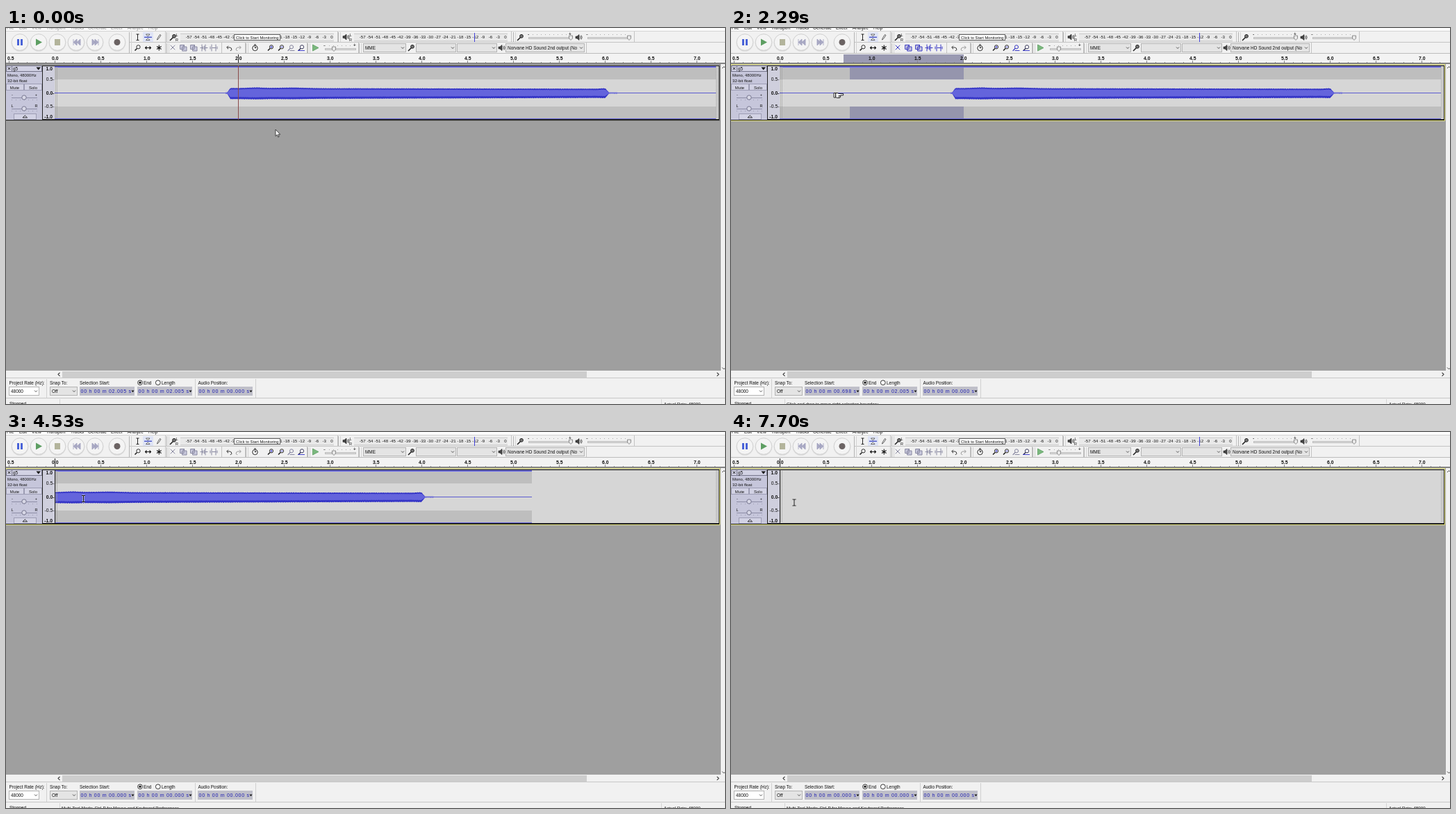
Write an HTML page that moves like this. It is 1035 by 541 pixels and loops after 8000 ms.

```html
<!DOCTYPE html>
<html lang="en">
<head>
<meta charset="utf-8">
<title>Audio editor</title>
<style>
  html, body { margin: 0; width: 100%; height: 100%; overflow: hidden; background: #9f9f9f; }
  svg { display: block; width: 1035px; height: 541px; }
  text { font: 6.45px "Liberation Sans", Arial, sans-serif; fill: #111; white-space: pre; }
  rect { shape-rendering: crispEdges; }
</style>
</head>
<body>
<svg id="stage" viewBox="0 0 1035 541"></svg>
<script>
const stage = document.getElementById('stage');

function el(tag, attrs, parent = stage, content) {
  const node = document.createElementNS('http://www.w3.org/2000/svg', tag);
  set(node, attrs);
  if (content !== undefined) node.textContent = content;
  return parent.appendChild(node);
}
function set(node, attrs) {
  for (const k in attrs) node.setAttribute(k, attrs[k]);
}
const rect = (x, y, width, height, fill, stroke, parent) =>
  el('rect', { x, y, width, height, fill, ...(stroke && { stroke, 'stroke-width': 1 }) }, parent);
const path = (d, stroke = '#222', fill = 'none', width = 1, parent) =>
  el('path', { d, stroke, fill, 'stroke-width': width }, parent);
const disc = (cx, cy, r, fill, stroke = 'none', parent) =>
  el('circle', { cx, cy, r, fill, stroke }, parent);
const label = (x, y, s, style = '', anchor = 'start', parent) =>
  el('text', { x, y, style, 'text-anchor': anchor }, parent, s);

const ORIGIN = 70, SCALE = 132;
const toX = sec => ORIGIN + sec * SCALE;
const toSec = x => Math.max(0, (x - ORIGIN) / SCALE);

// ---------- toolbars ----------
rect(0, 0, 1035, 52, '#f1f1f1');
rect(0, 0, 1035, 4, '#fdfdfd');
rect(0, 4, 1035, 1, '#d2d2d2');
rect(177, 20, 858, 1, '#c4c4c4');
rect(0, 36, 1035, 1, '#bcbcbc');
const menu = [['File', 1], ['Edit', 19], ['View', 37], ['Transport', 58], ['Tracks', 93],
  ['Generate', 118], ['Effect', 151], ['Analyze', 175], ['Help', 205]]
  .map(([s, x]) => label(x, 2.3, s));

[20, 47, 74, 101, 128, 160].forEach(x => {
  disc(x, 21.5, 12.3, '#dcdcdc');
  disc(x, 20.5, 11.8, '#f4f4f4', '#d0d0d0');
});
rect(16, 16, 3, 9, '#4a63d8');
rect(21, 16, 3, 9, '#4a63d8');
path('M43 15.5L52 20.5L43 25.5Z', 'none', '#5d9e62');
rect(70, 16, 8, 9, '#b3b49b');
path('M102 16V25L97 20.5ZM107 16V25L102 20.5ZM97 16V25', '#a0a0bd', '#a9a9c4', .8);
path('M124 16V25L129 20.5ZM128 16V25L133 20.5ZM133 16V25', '#a0a0bd', '#a9a9c4', .8);
disc(160, 20.5, 4.5, '#6b6363');

const grip = (x, y, h) => { rect(x, y, 1, h, '#b4b4b4'); rect(x + 3, y, 1, h, '#d4d4d4'); };
grip(177, 6, 30);
[[231, 6], [478, 6], [730, 6], [231, 22], [345, 22], [434, 22], [508, 22]].forEach(([x, y]) => grip(x, y, 14));
[229, 477, 727, 904].forEach(x => rect(x, 5, 1, 15, '#c4c4c4'));
[229, 310, 344, 433, 507, 835].forEach(x => rect(x, 21, 1, 15, '#c4c4c4'));

// editing tools
rect(197, 6, 15, 14, '#dfe4f5');
path('M187.5 9H191.5M189.5 9V17.5M187.5 17.5H191.5');
path('M199 13.3H210', '#4a55c8', 'none', 1.4);
path('M201.5 9H207L204.3 12ZM201.5 17.5H207L204.3 14.7Z', '#444', '#fff', .8);
path('M217.5 17L218.3 14.5L221.5 9.5L223 10.5L219.5 15.5Z', '#333', '#fff', .8);
path('M200.5 28.5H208.5M202.5 26.5L200.5 28.5L202.5 30.5M206.5 26.5L208.5 28.5L206.5 30.5', '#111', 'none', 1.1);
path('M220.3 24.5V32.5M217 26.5L223.6 30.5M223.6 26.5L217 30.5', '#111', 'none', 1.1);

function lens(x, y, color = '#222', sign = '') {
  path(`M${x - 1} ${y + 1}L${x - 4} ${y + 4}`, color, 'none', 1.6);
  disc(x + 1, y - 1.2, 2.6, '#fff', color);
  if (sign) path(`M${x - .5} ${y - 1.2}h3` + (sign === '+' ? `M${x + 1} ${y - 2.7}v3` : ''), '#33c', 'none', .9);
}
lens(189.5, 28.5);
lens(381, 28.5, '#222', '+');
lens(396, 28.5, '#222', '-');
lens(425, 28.5, '#335');
path('M420 32.5H430', '#33c', 'none', .9);

function mic(x, y) {
  path(`M${x - 4} ${y + 4.5}L${x + 1} ${y - .5}`, '#222', 'none', 1.6);
  disc(x + 2, y - 1.7, 2.4, '#777', '#222');
}
function speaker(x, y) {
  path(`M${x - 4} ${y - 1.5}h2l3 -2.5v8l-3 -2.5h-2Z`, '#222', '#444', .6);
  path(`M${x + 2.5} ${y - 2}q1.6 2 0 4M${x + 4} ${y - 3}q2.4 3 0 6`, '#222', 'none', .8);
}
mic(240, 13.5); mic(740, 13.5); mic(583, 28.5);
speaker(489, 13); speaker(824, 13.5); speaker(713, 28.5);

// level meters
for (const x of [251, 501]) {
  rect(x, 7, 221, 13, '#e9e9e9');
  rect(x, 8, 221, 1, '#cfcfcf');
  rect(x, 18, 221, 1, '#cfcfcf');
  label(x - 5, 11.5, 'L', 'font-size:5.5px', 'middle');
  label(x - 5, 18.5, 'R', 'font-size:5.5px', 'middle');
  for (let db = -57; db <= 0; db += 3)
    label(x + 218 + db * 3.61, 15.4, db, 'font-size:6.1px', 'middle');
}
rect(674, 7, 1, 13, '#4444dd');
rect(328.5, 9.5, 66, 8, '#fff', '#666');
label(331, 15.7, 'Click to Start Monitoring', 'font-size:5.8px');

function slider(x, end, thumb, y, h = 6) {
  rect(x, y, end - x, 2, '#dedede', '#bdbdbd');
  for (let i = x; i <= end; i += 6) rect(i, y - 4, 1, 1, '#aaa');
  path(`M${thumb - 2.5} ${y - 2}h5v${h - 2}l-2.5 2.5l-2.5 -2.5Z`, '#777', '#e9e9e9', .8);
}
slider(752, 812, 813, 13); slider(837, 896, 897, 13); slider(459, 503, 472, 29);
label(751, 11, '-'); label(810, 11, '+'); label(835, 11, '-'); label(457, 27, '-'); label(500, 27, '+');
path('M441.5 24L450 28.5L441.5 33Z', '#559a5a', '#7bb87e', .7);

const chevron = (x, y) => path(`M${x - 2} ${y - 1}l2 2l2 -2`, '#444', 'none', .9);
function combo(x, y, w, h, s, fill = '#e4e4e4') {
  rect(x + .5, y + .5, w, h, fill, '#b4b4b4');
  chevron(x + w - 4, y + h / 2 + .5);
  label(x + 3, y + h / 2 + 2.8, s);
}
combo(514, 22, 61, 12, 'MME');
combo(590, 22, 57, 12, '');
combo(649, 22, 57, 12, '');
combo(719, 22, 113, 12, 'Norvane HD Sound 2nd output (No');

// clipboard icons that follow the selection
const clipIcons = el('g', { 'stroke-linecap': 'round' });
path('M237 25L243 31M243 25L237 31', null, 'none', 1, clipIcons);
for (const x of [251, 266]) {
  rect(x + .5, 24.5, 5, 6, '#ddd', null, clipIcons);
  path(`M${x} 24.5h5v6h-5ZM${x + 3} 27h6v6h-6Z`, null, '#c9c9dd', 1, clipIcons);
}
path('M282 24V33M287 24V33M280 28.5h2M287 28.5h3M283.5 27v3M285.5 26v5', null, 'none', 1, clipIcons);
path('M296 24V33M302 24V33M294 27v3M304 27v3M297 28.5h5', null, 'none', 1, clipIcons);
disc(411, 27.3, 2.6, '#eee', null, clipIcons);
path('M409 29.5L406 32.5M409 32.5h6', null, 'none', 1.2, clipIcons);
clipIcons.querySelectorAll('*').forEach(n => n.removeAttribute('stroke'));

path('M318 28h4.5q2.5 .3 2.3 3.5q-.3 1 -2 1M320 25.7L317.7 28L320 30.3', '#333', 'none', 1);
path('M338 28h-4.5q-2.5 .3 -2.3 3.5q.3 1 2 1M336 25.7L338.3 28L336 30.3', '#999', 'none', 1);
disc(358.5, 29, 3.7, '#fff', '#222');
path('M358.5 29V26.5M358.5 29L360.5 28M357 24H360', '#222', 'none', 1);

// ---------- time ruler ----------
rect(0, 37, 1035, 14, '#f3f3f3');
const rulerSel = rect(0, 38, 0, 12, '#9a9ab2');
for (let i = -5; i <= 72; i++) {
  const x = Math.round(toX(i / 10)), major = i % 5 === 0;
  rect(x, major ? 47 : 48.5, 1, major ? 3 : 1.5, '#888');
  if (major) label(x + (i < 0 ? 3 : .8), 46.3, Math.abs(i / 10).toFixed(1), 'font-size:6.8px;font-weight:bold', i < 0 ? 'end' : 'middle')
    .setAttribute('x', i < 0 ? 11.5 : x + .8);
}
const rulerMark = rect(0, 38, 1, 12, '#222');
rect(0, 50, 1035, 1, '#6a6a6a');
rect(0, 51, 1035, 442, '#9f9f9f');

// ---------- track ----------
const focus = rect(.5, 52.5, 1027, 81, 'none', '#e2e07a');
rect(0, 54, 1027, 79, '#222');
rect(0, 54, 52, 78, '#c6c6db');
rect(53, 55, 17, 76, '#cfcfdd');
rect(70, 55, 956, 76, '#d6d6d6');

rect(.5, 54.5, 51, 8, '#d2d2e4', '#77778c');
path('M2.8 56.6L6.2 60M6.2 56.6L2.8 60', '#111', 'none', 1);
rect(8, 55, 1, 8, '#77778c');
label(10, 61, 'g5');
path('M43.5 56.5H50L46.7 60.5Z', 'none', '#111');
label(2, 69.7, 'Mono, 48000Hz', 'font-size:5.9px');
label(2, 78, '32-bit float', 'font-size:6.1px');
rect(.5, 80.5, 25, 9, '#d2d2e4', '#9d9db4');
rect(26.5, 80.5, 25, 9, '#d2d2e4', '#9d9db4');
label(12.5, 87.6, 'Mute', 'font-size:6px', 'middle');
label(39, 87.6, 'Solo', 'font-size:6px', 'middle');
for (const [y, a, b] of [[100, '-', '+'], [116, 'L', 'R']]) {
  rect(8, y, 37, 1, '#8d8da6');
  for (let x = 8; x < 46; x += 6) rect(x, y + 3, 1, 1, '#9a9ab0');
  disc(26, y, 3.2, '#d8d8e6', '#777790');
  label(9, y - 2.5, a, 'font-size:5.6px', 'middle');
  label(43.5, y - 2.5, b, 'font-size:5.6px', 'middle');
}
rect(11.5, 123.5, 32, 8, '#d2d2e4', '#9d9db4');
path('M24 129L27.3 125.8L30.6 129Z', '#222', 'none', .9);

[['1.0', 61], ['0.5-', 76], ['0.0-', 95.5], ['-0.5-', 115.3], ['-1.0', 130]].forEach(([s, y], i) =>
  label(i % 4 ? 69.5 : 67, y, s, `font-size:6.8px;font-weight:${i % 2 ? 400 : 700}`, 'end'));

// audio clip
const BAND_Y = [56, 113], BAND_H = [18, 17];
const clip = el('g', {});
const bands = BAND_Y.map((y, i) => rect(70, y, 0, BAND_H[i], '#bebebe', null, clip));
const bandSel = BAND_Y.map((y, i) => rect(0, y, 0, BAND_H[i], '#9595ad', null, clip));
const rails = [55, 129.5].map(y => rect(70, y, 0, 1.5, '#6a6ade', null, clip));
const axis = rect(70, 93, 0, 1, '#5c5cd0', null, clip);
const mask = el('clipPath', { id: 'mask' });
const maskRect = rect(70, 54, 0, 78, '#000', null, mask);
const waveBox = el('g', { 'clip-path': 'url(#mask)' }, clip);
const wave = el('g', {}, waveBox);

// edges of the sound: quiet lead-in, long sustain, short release
function gate(x) {
  if (x < 319 || x > 868) return .12;
  return Math.min(1, .2 + (x - 319) / 5, .12 + (868 - x) / 6);
}
function envelope(high, low, ripple) {
  const upper = [], lower = [];
  for (let x = 316; x <= 880; x++) {
    const fade = (x - 322) / 545, g = gate(x);
    const bump = 1.1 * Math.exp(-(((x - 360) / 16) ** 2)) + Math.exp(-(((x - 412) / 24) ** 2))
      + .8 * Math.exp(-(((x - 860) / 6) ** 2));
    const noise = ripple * (Math.sin(x * 1.9) + Math.sin(x * 2.77 + Math.sin(x * .31) * 3));
    upper.push(`${x} ${(93.5 - g * (high - fade + bump * .8 + noise)).toFixed(2)}`);
    lower.unshift(`${x} ${(93.5 + g * (low - 1.8 * fade + bump * .4 - noise)).toFixed(2)}`);
  }
  return 'M' + upper.concat(lower).join('L') + 'Z';
}
path(envelope(7.1, 8.8, .25), 'none', '#3434c6', 1, wave);
path(envelope(5.2, 5.9, .15), 'none', '#6464dc', 1, wave);

for (const x of [71, 73, 1022, 1024])
  el('path', { d: `M${x + .5} 56V130`, stroke: '#999', 'stroke-dasharray': '1 1' });
const playLine = rect(0, 54, 1, 78, '#222');

// ---------- scrollbars ----------
rect(1029, 52, 6, 441, '#f1f1f1');
path('M1031 58l2.5 -2.5l2.5 2.5M1031 488.5l2.5 2.5l2.5 -2.5', '#444', 'none', 1);
rect(0, 493, 1035, 48, '#f1f1f1');
rect(81, 494, 755, 9, '#cdcdcd');
path('M77.5 495.8L75 498.3L77.5 500.8M1023.5 495.8L1026 498.3L1023.5 500.8', '#333', 'none', 1.1);
rect(0, 503, 1035, 1, '#c8c8c8');

// ---------- selection bar ----------
label(4.5, 512.8, 'Project Rate (Hz):');
label(63, 512.8, 'Snap To:');
label(106, 512.8, 'Selection Start:');
label(198, 512.8, 'End');
label(224, 512.8, 'Length');
label(276.5, 512.8, 'Audio Position:');
disc(193, 510.3, 3.4, '#fff', '#333');
disc(193, 510.3, 1.8, '#222');
disc(218.8, 510.3, 3.4, '#fff', '#333');
combo(4, 516, 43, 12, '48000', '#fff');
combo(63, 516, 39, 12, 'Off');
[58, 272, 359].forEach(x => rect(x, 505, 1, 27, '#d0d0d0'));
const clocks = [106, 189, 276].map(x => {
  rect(x, 516, 79, 13, '#bfbfc9');
  path(`M${x + 74.5} 521.5h4l-2 2.8Z`, 'none', '#111');
  return label(x + 1.5, 525.2, '', 'font-size:7px;letter-spacing:.74px;fill:#2020b4');
});
const clockText = sec => `00 h 00 m ${sec.toFixed(3).padStart(6, '0')} s`;

// ---------- status bar ----------
rect(0, 532, 1035, 1, '#c8c8c8');
rect(77, 534, 1, 7, '#d4d4d4');
rect(943, 534, 1, 7, '#d4d4d4');
label(5, 543, 'Stopped.');
label(947, 543, 'Actual Rate: 48000', 'font-size:6.2px');
const status = label(80, 543, '', 'font-size:6.25px');
const HINTS = {
  arrow: '',
  panel: 'Drag the track vertically to change the order of the tracks.',
  beam: 'Multi-Tool Mode: Ctrl-P for Mouse and Keyboard Preferences',
  left: 'Click and drag to move left selection boundary.',
  right: 'Click and drag to move right selection boundary.'
};

// ---------- pointer ----------
const pointer = el('g', {});
const HAND = 'M.5 -1.5H7L9 -2.5H11.5V3.5L9.5 4.5H5.5L4.5 3V.8H.5ZM11.5 -2.5H14V4H11.5ZM5 1.5H7.5M5.5 3H7.5';
const shapes = {
  arrow: path('M0 0V9.5L2.2 7.6L3.8 11L5.2 10.3L3.7 7.2H6.7Z', '#222', '#fff', .8, pointer),
  beam: el('g', {}, pointer),
  left: path(HAND, '#111', '#fff', .9, pointer),
  right: path(HAND, '#111', '#fff', .9, pointer)
};
path('M-2 -4.5H2M0 -4.5V4.5M-2 4.5H2', '#fff', 'none', 2, shapes.beam);
path('M-2.5 -4.5H2.5M0 -4.5V4.5M-2.5 4.5H2.5', '#111', 'none', 1.1, shapes.beam);
set(shapes.right, { transform: 'scale(-1 1)' });

// pointer route: tick, x, y, kind
const ROUTE = [
  [0, 388, 146, 'arrow'], [1, 387.5, 145.5, 'arrow'], [6, 387.5, 145.5, 'arrow'], [8, 376, 135, 'arrow'],
  [9, 364, 122, 'beam'], [13, 328, 84, 'beam'], [15, 328.5, 82, 'beam'], [16, 328.5, 82, 'beam'],
  [17, 328.5, 83, 'beam'], [18, 328.5, 83, 'beam'], [21, 333, 89, 'left'], [22, 334, 90, 'left'],
  [26, 334, 90, 'left'], [27, 305, 92, 'right'], [28, 225, 95, 'right'], [29, 171, 96, 'right'],
  [30, 162.14, 96, 'right'], [33, 98, 97, 'right'], [35, 36, 98, 'right'], [37, 35, 97, 'panel'],
  [39, 35.5, 96.5, 'panel'], [40, 35.5, 96.5, 'panel'], [42, 36, 96, 'panel'], [45, 36, 96, 'panel'],
  [46, 37, 96.5, 'panel'], [49, 58, 97, 'panel'], [51, 85, 98, 'beam'], [56, 134, 99, 'beam'],
  [60, 104, 95, 'beam'], [63, 87, 96, 'beam'], [65, 87, 96, 'beam'], [70, 190, 96, 'beam'],
  [74, 264, 94, 'beam'], [75, 265, 94, 'beam'], [76, 265.9, 94, 'beam'], [77, 250, 95, 'left'],
  [81, 87.95, 103, 'left'], [83, 88, 104, 'left'], [84, 89, 104, 'left'], [86, 92, 102, 'beam'],
  [89, 91, 101.5, 'beam'], [104, 91, 101.5, 'beam']
];
function pose(tick) {
  let i = 0;
  while (i < ROUTE.length - 2 && ROUTE[i + 1][0] <= tick) i++;
  const [t0, x0, y0, kind] = ROUTE[i], [t1, x1, y1] = ROUTE[i + 1];
  const k = Math.min(1, (tick - t0) / (t1 - t0));
  return { x: x0 + (x1 - x0) * k, y: y0 + (y1 - y0) * k, kind };
}

const CUT_1 = 2.005, CUT_2 = 1.348;
function selection(tick) {
  if (tick < 27) return [CUT_1, CUT_1];
  if (tick < 46) return [toSec(pose(tick).x), CUT_1];
  if (tick < 76) return [0, 0];
  if (tick < 77) return [1.484, 1.484];
  if (tick < 83) return [Math.max(.136, toSec(pose(tick).x)), 1.484];
  if (tick < 98) return [.136, .136];
  if (tick < 99) return [.159, .159];
  if (tick < 100) return [0, 3.853];
  return [0, 0];
}

function draw(tick) {
  const focused = tick >= 25;
  const { x, y, kind } = pose(tick);
  const [from, to] = selection(tick);
  const ranged = to > from;

  menu.forEach(m => { m.style.fill = focused ? '#111' : '#888'; });
  set(focus, { stroke: focused ? '#e2e07a' : '#8a8a8a' });
  set(clipIcons, { stroke: ranged && tick < 90 ? '#3a3ac4' : '#8787a0' });

  const shift = SCALE * (tick < 46 ? 0 : tick < 83 ? CUT_1 : CUT_1 + CUT_2);
  const width = 952 - shift;
  set(clip, { visibility: tick < 100 ? 'visible' : 'hidden' });
  [...bands, ...rails, axis, maskRect].forEach(r => set(r, { width }));
  set(wave, { transform: `translate(${-shift} 0)` });

  // the track repaints one tick behind the ruler
  const lagged = tick === 99 ? from : Math.min(to, Math.max(from, selection(tick - 1)[0]));
  bandSel.forEach(r => set(r, { x: toX(lagged), width: ranged ? (to - lagged) * SCALE : 0 }));
  set(rulerSel, { x: toX(from), width: ranged ? (to - from) * SCALE : 0 });
  const mark = Math.floor(toX(from));
  set(rulerMark, { x: mark, visibility: ranged ? 'hidden' : 'visible' });
  set(playLine, { x: mark, fill: focused ? '#222' : '#8a4a4a', visibility: ranged ? 'hidden' : 'visible' });

  [from, to, 0].forEach((sec, i) => { clocks[i].textContent = clockText(sec); });
  status.textContent = HINTS[kind];

  set(pointer, { transform: `translate(${x.toFixed(2)} ${y.toFixed(2)})` });
  const shape = kind === 'panel' ? 'arrow' : kind;
  for (const k in shapes) set(shapes[k], { visibility: k === shape ? 'visible' : 'hidden' });
}

// the screen refreshes about thirteen times a second
const LOOP = 8000, TICK = 77.4, PHASE = 46;
const start = performance.now();
function frame() {
  const t = (performance.now() - start) % LOOP;
  draw(Math.floor((t + PHASE) / TICK));
  requestAnimationFrame(frame);
}
frame();
</script>
</body>
</html>
```
